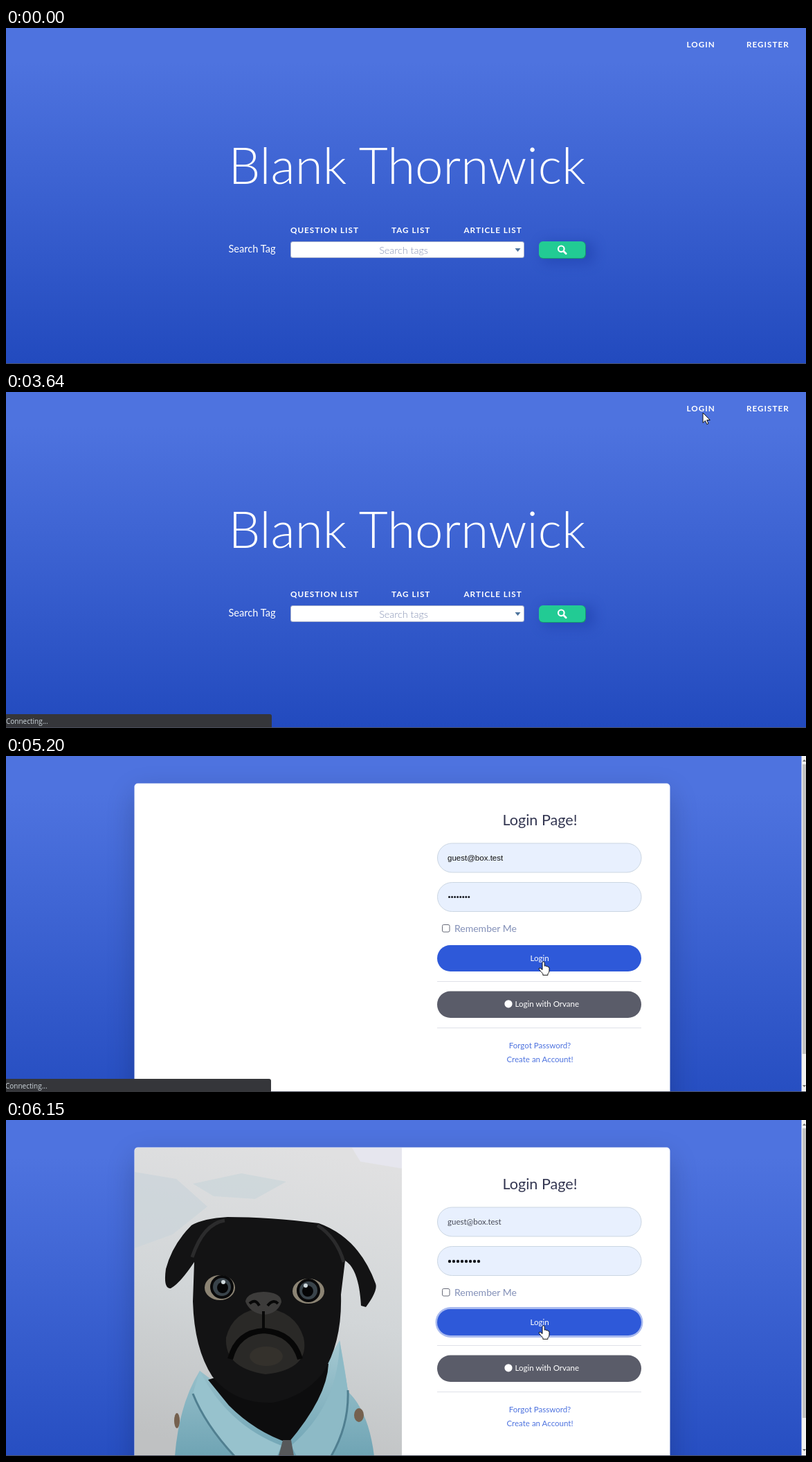
An HTML page for the animation above (8000 ms loop, 1156x485 px).

```html
<!DOCTYPE html>
<html lang="en">
<head>
<meta charset="utf-8">
<title>Login walkthrough</title>
<style>
  html, body { margin: 0; width: 100%; height: 100%; overflow: hidden; background: #224abe; }
  svg { display: block; width: 1156px; height: 485px; font-family: Lato, "Open Sans", sans-serif; }
  .nav { font-size: 11.7px; font-weight: 700; letter-spacing: 1px; fill: #fff; }
  .mid { text-anchor: middle; }
  .small { font-size: 11.52px; }
  .white { fill: #fff; }
  .link { fill: #4e73df; }
  .hint { fill: #8390b8; }
  .field { stroke: #cbd6e2; }
  .rule { stroke: #dfe1e8; }
  .soft { filter: blur(21px); opacity: .2; }
</style>
</head>
<body>
<svg viewBox="0 0 1156 485">
  <defs>
    <linearGradient id="sky" x1="0" y1="0" x2="0" y2="1">
      <stop offset=".1" stop-color="#4e73df"/><stop offset="1" stop-color="#224abe"/>
    </linearGradient>
    <linearGradient id="wall" x1=".6" y1="0" x2=".4" y2="1">
      <stop offset="0" stop-color="#e0e0e1"/><stop offset=".5" stop-color="#d2d6d8"/>
      <stop offset="1" stop-color="#bfc1c2"/>
    </linearGradient>
    <linearGradient id="denim" x1="0" y1="0" x2="0" y2="1">
      <stop offset="0" stop-color="#a5c9d2"/><stop offset="1" stop-color="#6fa4b4"/>
    </linearGradient>
    <clipPath id="frame"><path d="M572 40H190Q186 40 186 44V485H572Z"/></clipPath>
  </defs>

  <g id="home">
    <rect width="1156" height="485" fill="url(#sky)"/>
    <g class="nav">
      <text x="983.500" y="28">LOGIN</text>
      <text x="1070" y="28">REGISTER</text>
      <text x="411" y="295.500">QUESTION LIST</text>
      <text x="557" y="295.500">TAG LIST</text>
      <text x="661.500" y="295.500">ARTICLE LIST</text>
    </g>
    <text class="mid white" x="579.500" y="225" font-size="72.600" font-weight="300">Blank Thornwick</text>
    <text class="white" x="321.500" y="323.500" font-size="14.600">Search Tag</text>
    <rect x="411" y="308" width="338" height="24" rx="3.500" fill="#a9b2cc"/>
    <rect x="412" y="309" width="336" height="22" rx="2.500" fill="#fff"/>
    <text class="mid" x="574.500" y="325.500" font-size="14.400" font-weight="300" fill="#8591b3">Search tags</text>
    <path d="M735.500 318h8l-4 5z" fill="#4d739c"/>
    <rect x="774" y="308" width="76" height="32" rx="8" fill="#12309a" opacity=".35" style="filter:blur(9px)"/>
    <rect x="770" y="308" width="68" height="25" rx="6" fill="#17986c"/>
    <rect x="770" y="308" width="67" height="24" rx="6" fill="#22cb94"/>
    <g fill="none" stroke="#fff" stroke-linecap="round">
      <circle cx="802.300" cy="318.800" r="4.300" stroke-width="2.200"/>
      <path d="M806 322.500l3.200 3.200" stroke-width="2.800"/>
    </g>
  </g>

  <g id="login">
    <rect width="1156" height="535" fill="url(#sky)"/>
    <rect class="soft" x="186" y="54" width="773" height="470"/>
    <rect x="185.500" y="39.500" width="774" height="470" rx="5" fill="#fff"/>

    <g id="photo" clip-path="url(#frame)">
      <rect x="186" y="40" width="386" height="445" fill="url(#wall)"/>
      <path d="M186 75l60 10 45 40-50 40-55 20z" fill="#cbd5da" opacity=".7"/>
      <path d="M270 92l70-15 65 12-45 25-60-4z" fill="#cad6db" opacity=".7"/>
      <path d="M500 40h72v30l-60-10z" fill="#e6e6ee"/>
      <path d="M244 485Q250 410 280 362L330 400 440 390 482 318Q490 360 494 392 524 420 532 485Z" fill="url(#denim)"/>
      <path d="M292 375Q365 350 466 352 464 400 408 466 360 450 322 412Z" fill="#0d0d0e"/>
      <path d="M320 140Q285 142 268 152 240 180 231 215 227 244 238 243 252 235 272 205L270 262Q272 330 298 370 330 410 385 408 430 400 458 365 486 320 484 252L490 203Q510 215 513 268L520 270Q538 246 534 236 510 170 452 149 380 140 320 140Z" fill="#131314"/>
      <path d="M316 145Q285 150 269 198M450 152Q478 170 488 205" fill="none" stroke="#2b2b2c" stroke-width="5"/>
      <path d="M318 314Q328 275 372 271 418 275 430 314 440 360 375 367 315 358 318 314Z" fill="#2a2927"/>
      <g fill="#8c8474">
        <ellipse cx="309" cy="242" rx="22" ry="18"/><ellipse cx="437" cy="247" rx="23" ry="18"/>
      </g>
      <g fill="#39434a" stroke="#09090a" stroke-width="4">
        <circle cx="312" cy="241" r="15"/><circle cx="437" cy="246" r="15"/>
      </g>
      <g fill="#050506"><circle cx="313" cy="242" r="8"/><circle cx="436" cy="247" r="8"/></g>
      <g fill="#cfd8dc"><circle cx="314" cy="234" r="3"/><circle cx="433" cy="239" r="3"/></g>
      <path d="M346 262Q348 249 372 248 398 249 398 263 392 280 372 281 352 278 346 262Z" fill="#3d3c3b"/>
      <path d="M352 265q8-8 14 3M378 268q8-10 15-3M372 276v27" fill="none" stroke="#080808" stroke-width="4"/>
      <path d="M324 345Q334 306 373 304 414 307 425 345" fill="none" stroke="#070707" stroke-width="8"/>
      <ellipse cx="376" cy="341" rx="24" ry="14" fill="#34312c"/>
      <path d="M280 362Q320 440 398 470L392 485H330Q288 440 270 395Z" fill="#97c2cd"/>
      <path d="M482 318Q482 410 412 470L420 485H470Q496 440 494 390Z" fill="#8dbac6"/>
      <path d="M270 395Q288 440 330 485M494 390Q496 440 470 485" fill="none" stroke="#507f90" stroke-width="3"/>
      <path d="M400 462l12 0 4 23h-22z" fill="#56585a"/>
      <ellipse cx="510" cy="426" rx="7" ry="10" fill="#75614f"/>
      <ellipse cx="247" cy="434" rx="4" ry="11" fill="#75614f"/>
    </g>

    <text class="mid" x="771.500" y="99.500" font-size="21.600" fill="#343752">Login Page!</text>
    <g id="fields" class="field">
      <rect x="623.500" y="126" width="294.500" height="42" rx="21"/>
      <rect x="623.500" y="182.500" width="294.500" height="42" rx="21"/>
    </g>
    <g id="hints" class="small hint">
      <text x="638" y="151">Enter Email Address...</text>
      <text x="638" y="207">Password</text>
    </g>
    <text id="email" x="638" y="150.500" font-size="11.520">guest@box.test</text>
    <path id="dots" stroke="#15181f" stroke-linecap="round"/>
    <rect x="630.500" y="243.500" width="10.500" height="10.500" rx="2" fill="#fff" stroke="#676a78"/>
    <text class="hint" x="648" y="253.500" font-size="14">Remember Me</text>
    <rect id="ring" x="620.500" y="270" width="300" height="44" rx="22" fill="#a9baef"/>
    <rect id="button" x="623" y="273" width="295" height="38" rx="19"/>
    <text class="mid small white" x="771" y="295.500">Login</text>
    <path class="rule" d="M623 325.500h295M623 392.500h295"/>
    <rect x="623" y="339.500" width="295" height="38.500" rx="19.200" fill="#5a5c69"/>
    <circle id="mark" class="white" cx="726" cy="357.800" r="5.600"/>
    <text class="small white" x="735.500" y="362">Login with Orvane</text>
    <g class="mid small link">
      <text x="771.500" y="421.500">Forgot Password?</text>
      <text x="771.500" y="441.500">Create an Account!</text>
    </g>
    <rect x="1149.500" width="7" height="485" fill="#f1f1f1"/>
    <rect x="1151" y="12" width="5" height="418" fill="#c1c1c1"/>
    <path d="M1151 8l2.500-3 2.500 3zM1151 475l2.500 3 2.500-3z" fill="#6b6b6b"/>
  </g>

  <rect y="484" width="1156" height="1" fill="#4b4e5c"/>
  <g id="status">
    <path d="M0 465H381Q384 465 384 468V484H0Z" fill="#35363a"/>
    <text id="message" x="0" y="479.300" font-size="10" fill="#cdd6dc" font-family="Open Sans, Noto Sans, sans-serif"></text>
  </g>

  <g id="cursor" stroke-linejoin="round">
    <path id="arrow" d="M0 0V14.500L3.400 11.400 5.800 16.600 8 15.600 5.700 10.500H10.300Z" fill="#fff" stroke="#111"/>
    <path id="hand" d="M1 1.500Q1-.2 2.600-.2T4.200 1.500V6.200Q5.600 5.200 6.800 6.600 8.200 6 9.200 7.500 11 7.300 11 9.200V13Q11 16 9 17.300V19.300H1.800V17.300Q-1 14.500-3.600 11.200-4.600 9.500-3 9-1.600 8.800 1 11.500Z" fill="#fff" stroke="#111"/>
    <path id="beam" d="M-2.500-7.500H2.500M0-7.500V7.500M-2.500 7.500H2.500" fill="none" stroke="#222"/>
  </g>
</svg>
<script>
  const el = Object.fromEntries([...document.querySelectorAll("[id]")].map(e => [e.id, e]));
  const show = (name, on) => { el[name].style.display = on ? "" : "none"; };
  const clamp = v => Math.min(1, Math.max(0, v));

  // start, end, steps, from x, y, to x, y; the first step lands at the start
  const moves = [
    [450, 580, 3, 1151, 629, 1037, 151],
    [850, 1540, 10, 1037, 151, 1008, 19],
    [1680, 1750, 2, 1008, 19, 1007, 30],
    [3720, 3720, 1, 1007, 30, 997, 35],
    [3770, 3970, 4, 997, 35, 818, 75],
    [4240, 4650, 7, 818, 75, 747, 257],
    [4990, 5200, 4, 747, 257, 774, 297]
  ];

  function pointer(t) {
    const move = moves.filter(m => m[0] <= t).pop();
    if (!move) return null;
    const [start, end, steps, x0, y0, x1, y1] = move;
    const done = Math.floor((t - start) / (end - start || 1) * (steps - 1) + 1e-6) + 1;
    const p = Math.min(1, done / steps);
    return [x0 + (x1 - x0) * p, y0 + (y1 - y0) * p];
  }

  function cursorKind(t, y) {
    if (t < 3720) return y <= 32 && t < 3100 ? "hand" : "arrow";
    if ((y > 126 && y < 168) || (y > 182 && y < 225)) return "beam";
    const busy = t >= 5600 && t < 5880;
    return y > 273 && y < 311 && !busy ? "hand" : "arrow";
  }

  function draw(t) {
    const onLogin = t >= 3720, filled = t >= 3840, clicked = t >= 5600;
    show("home", !onLogin);
    show("login", onLogin);
    show("photo", t >= 5740);
    show("ring", t >= 5530);
    show("mark", t >= 3770);
    show("hints", !filled);
    show("email", filled);
    show("dots", filled);

    el.fields.setAttribute("fill", filled ? "#e8f0fe" : "#fff");
    el.email.setAttribute("fill", clicked ? "#474a57" : "#111");
    el.email.setAttribute("font-family", clicked ? "Lato, sans-serif" : "Liberation Sans, Arial, sans-serif");
    el.dots.setAttribute("d", clicked ? "M641 204h42.500" : "M640.500 203.500h28.500");
    el.dots.setAttribute("stroke-dasharray", clicked ? "0 6" : "0 4.050");
    el.dots.setAttribute("stroke-width", clicked ? 4.4 : 3);

    const hover = clamp((t - 5060) / 140);
    const mix = (a, b) => Math.round(a + (b - a) * hover);
    el.button.setAttribute("fill", `rgb(${mix(78, 46)},${mix(115, 89)},${mix(223, 217)})`);

    show("status", t >= 1470 && t < 6150);
    el.status.style.opacity = 1 - clamp((t - 5950) / 200);
    el.status.setAttribute("transform", onLogin ? "translate(-1 1)" : "");
    el.message.textContent = t < 1680 ? "127.0.0.1:8000/login" : "Connecting...";

    const at = pointer(t);
    show("cursor", at);
    if (!at) return;
    el.cursor.setAttribute("transform", `translate(${at[0]} ${at[1]})`);
    const kind = cursorKind(t, at[1]);
    for (const name of ["arrow", "hand", "beam"]) show(name, name === kind);
  }

  const begin = performance.now();
  function tick() {
    draw((performance.now() - begin) % 8000);
    requestAnimationFrame(tick);
  }
  tick();
</script>
</body>
</html>
```
